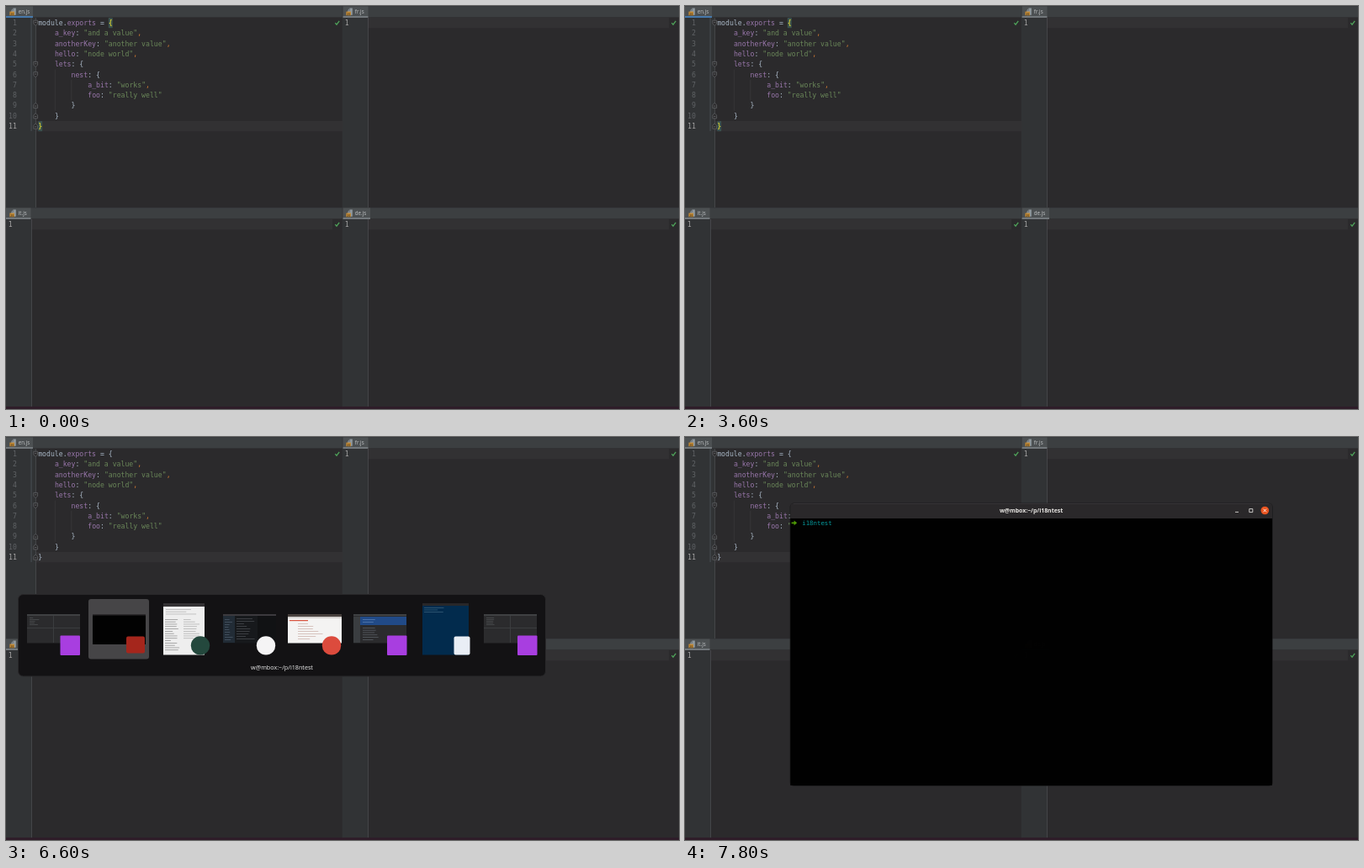
Recreate the animation shown at these times as an HTML page. Size 800 by 480 pixels, loop 8 s.

```html
<!DOCTYPE html>
<html lang="en">
<head>
<meta charset="utf-8">
<title>Editor and terminal</title>
<style>
  html, body { margin: 0; width: 100%; height: 100%; overflow: hidden; background: #2b2a2c; }
  svg { display: block; width: 800px; height: 480px; }
  .code { font: 8.17px "DejaVu Sans Mono", monospace; white-space: pre; }
  .ui { font-family: "Open Sans", "Noto Sans", sans-serif; }
</style>
</head>
<body>
<svg id="stage" viewBox="0 0 800 480" xmlns="http://www.w3.org/2000/svg"></svg>
<script>
const NS = "http://www.w3.org/2000/svg";
const stage = document.getElementById("stage");
const LOOP = 8000, CHAR = 4.92, LINE = 12.3;
const C = {
  bg: "#2b2a2c", gutter: "#313335", bar: "#3c3f41", tab: "#4c5052", row: "#323133",
  text: "#a9b7c6", key: "#9876aa", str: "#6a8759", comma: "#cc7832",
  num: "#606366", active: "#4a88c7", idle: "#7f868b", caret: "#c8c8c8"
};

function add(parent, tag, attrs, text) {
  const el = document.createElementNS(NS, tag);
  for (const k in attrs) el.setAttribute(k, attrs[k]);
  if (text !== undefined) el.textContent = text;
  parent.appendChild(el);
  return el;
}
const group = (parent, attrs = {}) => add(parent, "g", attrs);
const rect = (p, x, y, width, height, fill, more = {}) =>
  add(p, "rect", { x, y, width, height, fill, ...more });
const path = (p, d, stroke, width = 1, fill = "none") =>
  add(p, "path", { d, stroke, "stroke-width": width, fill });
const label = (p, x, y, text, fill, more = {}) =>
  add(p, "text", { x, y, fill, class: "code", ...more }, text);
const show = (el, on) => el.setAttribute("visibility", on ? "visible" : "hidden");

function fileIcon(p) {
  path(p, "M6.2 5.2 L8.6 2.6 H11.8 V10.8 H6.2 Z", "none", 0, "#8f989e");
  path(p, "M6.2 5.2 H8.6 V2.6", "#5b6064", .6);
  rect(p, 4.4, 6.6, 5.6, 4.6, "#c28a35");
  label(p, 5, 10.5, "JS", "#4b3a20", { style: "font-size:3.6px;font-weight:bold" });
}

// An editor pane with its tab, gutter, check mark and caret row.
function pane(x, y, name, tabWidth, gutter, rowY, lastPane) {
  const g = group(stage, { transform: `translate(${x} ${y})` });
  rect(g, 0, 0, 400, 240, C.bg);
  rect(g, 0, 13.5, gutter, 226.5, C.gutter);
  rect(g, gutter, rowY, 400 - gutter, 12.3, C.row);
  rect(g, 388, 14, 12, 12.3, C.bg);
  rect(g, 0, 0, 400, 13.5, C.bar);
  rect(g, 0, 0, 400, .7, "#343638");
  rect(g, 0, .5, tabWidth, 12, C.tab);
  rect(g, 0, 13.3, 400, .6, "#303032");
  const line = rect(g, 0, 12.2, tabWidth, 1.6, C.idle);
  fileIcon(g);
  add(g, "text", { x: 14.8, y: 9.3, fill: "#bfc2c4", class: "ui", "font-size": 6.2 }, name);
  path(g, "M391.3 20.2 L393 22.2 L396.2 17.8", "#4fa35a", 1.3);
  rect(g, gutter, 14, .8, 226, "#4b4d50");
  if (x) rect(g, -.4, 0, .9, 240, "#323436");
  const caret = rect(g, gutter + 2.8, 14.2, 1, 11.8, C.caret);
  return { g, line, caret };
}

function number(p, n, right, y, current) {
  label(p, right, y, n, current ? "#a4a3a3" : C.num, { "text-anchor": "end" });
}

const en = pane(0, 0, "en.js", 32, 35, 137, false);
const fr = pane(400, 0, "fr.js", 30.5, 30, 14);
const it = pane(0, 240, "it.js", 29.5, 30, 14);
const de = pane(400, 240, "de.js", 33, 30, 14);
for (const p of [fr, it, de]) number(p.g, 1, 7.7, 23, true);
en.caret.setAttribute("x", 43);
en.caret.setAttribute("y", 137.2);

const source = [
  "module.exports = {",
  '    a_key: "and a value",',
  '    anotherKey: "another value",',
  '    hello: "node world",',
  "    lets: {",
  "        nest: {",
  '            a_bit: "works",',
  '            foo: "really well"',
  "        }",
  "    }",
  "}"
];
const colX = n => 38.2 + n * CHAR;
const baseY = n => 23 + n * LINE;

function codeLine(p, text, row) {
  const parts = text.match(/"[^"]*"|\w+|,|[^\w",]+/g);
  let col = 0;
  for (const part of parts) {
    const fill = part[0] === '"' ? C.str
      : part === "," ? C.comma
      : /^\w/.test(part) && part !== "module" ? C.key : C.text;
    if (part.trim()) {
      const lead = part.length - part.trimStart().length;
      label(p, colX(col + lead), baseY(row), part.trim(), fill);
    }
    col += part.length;
  }
}

rect(en.g, 29.6, 14, .9, 135, "#4d5358");
for (const [col, from, to] of [[4, 5, 9], [8, 6, 8]])
  rect(en.g, colX(col), 14 + from * LINE, .6, (to - from) * LINE, "#3d3d3f");

source.forEach((text, row) => {
  number(en.g, row + 1, 12.8, baseY(row), row === 10);
  codeLine(en.g, text, row);
});

for (const row of [0, 4, 5, 8, 9, 10]) {
  const flip = row > 6 ? -1 : 1;
  const f = group(en.g, { transform: `translate(35.2 ${20.2 + row * LINE}) scale(1 ${flip})` });
  path(f, "M-2.4 -3 H2.4 V.8 L0 3.2 L-2.4 .8 Z", "#66696c", .7, C.bg);
  path(f, "M-1.2 -.6 H1.2", "#7a7d80", .6);
}

const braces = group(en.g);
for (const [col, row, mark] of [[17, 0, "{"], [0, 10, "}"]]) {
  rect(braces, colX(col), 14 + row * LINE, CHAR, 12.2, "#3b514d");
  label(braces, colX(col), baseY(row), mark, "#ffef28", { "font-weight": "bold" });
}
en.g.appendChild(en.caret);

rect(stage, 0, 477.2, 800, 2.8, "#2e1c28");

// Window switcher
const switcher = group(stage);
rect(switcher, 14.5, 187.5, 627, 97.5, "#131214", { rx: 6, stroke: "#29282a", "stroke-width": 1 });
rect(switcher, 98, 193, 72, 71.5, "#464547", { rx: 3 });

let seed = 7;
const random = () => (seed = seed * 16807 % 2147483647) / 2147483647;

function lines(p, x, y, w, count, step, fill) {
  for (let i = 0; i < count; i++)
    rect(p, x, y + i * step, w * (.35 + .65 * random()), .7, fill, { opacity: .65 });
}

function ideThumb(x, blue) {
  rect(switcher, x, 211, 63, 34.5, "#2b2b2d");
  rect(switcher, x, 211, 63, 2, "#3f4143");
  if (blue) {
    rect(switcher, x + 8, 214, 55, 10, "#214a87");
    lines(switcher, x + 11, 217, 24, 2, 3, "#80a3d0");
    lines(switcher, x + 11, 227, 25, 6, 2.8, "#78808a");
    rect(switcher, x, 214, 8, 31, "#3a3d40");
  } else {
    rect(switcher, x, 227, 63, 1, "#3b3d3f");
    rect(switcher, x + 31, 213, 1, 32, "#3b3d3f");
    lines(switcher, x + 3, 215, 12, 5, 2, "#64696a");
  }
}

ideThumb(25);
rect(switcher, 103, 211, 63, 36, "#020202");
rect(switcher, 103, 211, 63, 1.5, "#2b292b");

rect(switcher, 187, 198, 49, 61.5, "#eeeeee");
rect(switcher, 187, 198, 49, 4, "#343234");
lines(switcher, 190, 205, 43, 3, 2.8, "#8a8a8a");
lines(switcher, 189, 217, 18, 14, 2.8, "#555555");
lines(switcher, 211, 217, 20, 9, 2.8, "#888888");

rect(switcher, 258, 211, 63, 34.5, "#17191c");
rect(switcher, 258, 211, 63, 2, "#3c3a3e");
rect(switcher, 258, 213, 14, 32, "#222c36");
lines(switcher, 260, 217, 10, 9, 3, "#667889");
lines(switcher, 274, 216, 23, 9, 3, "#666a70");
rect(switcher, 299, 213, 22, 32, "#111214");

rect(switcher, 335, 211, 64, 34.5, "#f4f3f2");
rect(switcher, 335, 211, 64, 3, "#49423f");
rect(switcher, 335, 214, 64, 2, "#d5d2d0");
rect(switcher, 337, 218, 22, 1.2, "#d9543f");
lines(switcher, 347, 222, 31, 7, 3, "#b58b82");

ideThumb(413, true);

rect(switcher, 495, 198, 55, 61.5, "#022b4d");
rect(switcher, 495, 198, 55, 3, "#282729");
lines(switcher, 497, 203, 25, 3, 2.6, "#608098");

ideThumb(568);

for (const x of [64.5, 453, 608])
  rect(switcher, x, 236.5, 23.5, 23.5, "#a83ee0", { rx: 1 });
rect(switcher, 143, 237.5, 22, 20, "#a5261c", { rx: 2 });
rect(switcher, 532.5, 237.5, 19, 22, "#e9eef5", { rx: 2 });
for (const [cx, fill] of [[231, "#24483d"], [309, "#f5f4f5"], [387, "#dc4b3d"]])
  add(switcher, "circle", { cx, cy: 248.4, r: 11.2, fill });

const prompt = "w@mbox:~/p/i18ntest";
add(switcher, "text", {
  x: 328, y: 277.2, fill: "#eeeeee", class: "ui", "font-size": 7.2, "text-anchor": "middle"
}, prompt);

// Terminal window
const terminal = group(stage);
rect(terminal, 124.6, 78.6, 574.2, 337.4, "#151416", { rx: 5, opacity: .65 });
rect(terminal, 125.3, 97, 572.7, 318, "#000000", { opacity: .97 });
path(terminal, "M125.3 97 V83 Q125.3 79 129.3 79 H694 Q698 79 698 83 V97 Z", "none", 0, "#2a282a");
path(terminal, "M129 79.5 H694", "#3b393b", .7);
add(terminal, "text", {
  x: 411.5, y: 90.4, fill: "#e8e6e3", class: "ui", "font-size": 6.9,
  "font-weight": "bold", "text-anchor": "middle"
}, prompt);
path(terminal, "M654 89.4 H658", "#d8d6d4", .9);
path(terminal, "M670.8 85.6 H674.8 V89.6 H670.8 Z", "#d8d6d4", .9);
add(terminal, "circle", { cx: 689.3, cy: 87.5, r: 4.8, fill: "#e95420" });
path(terminal, "M687.5 85.7 l3.6 3.6 m0 -3.6 l-3.6 3.6", "#ffffff", .9);
const arrow = path(terminal,
  "M126.6 101.4 H129.6 V99.4 L133.2 102.3 L129.6 105.2 V103.2 H126.6 Z", "none", 0, "#4e9a06");
label(terminal, 139.2, 104.9, "i18ntest", "#06989a", {
  style: "font-size:7.39px", "font-weight": "bold"
});
const block = rect(terminal, 179, 97.8, 4.4, 8.4, "#b4b4b4");

// Each entry: pane, focus start, focus end, caret toggle times (starting hidden)
const focus = [
  [en, 0, 3800, [200, 600, 1200, 1600, 2000, 2600, 3000, 3600]],
  [fr, 3800, 4400, [3800, 4400]],
  [it, 4600, 5200, [4600, 5200]],
  [de, 5200, LOOP, [5200, 6200]]
];

function draw(t) {
  for (const [p, from, to, toggles] of focus) {
    p.line.setAttribute("fill", t >= from && t < to ? C.active : C.idle);
    show(p.caret, toggles.filter(at => at <= t).length % 2 === 1);
  }
  show(braces, t < 3800);
  show(switcher, t >= 6600 && t < 7200);
  show(terminal, t >= 7200);
  show(block, t >= 7200 && t < 7800);
  arrow.setAttribute("fill", t < 7400 ? "#6f8c13" : "#4e9a06");
}

const start = performance.now();
function tick() {
  draw((performance.now() - start) % LOOP);
  requestAnimationFrame(tick);
}
draw(0);
requestAnimationFrame(tick);
</script>
</body>
</html>
```
